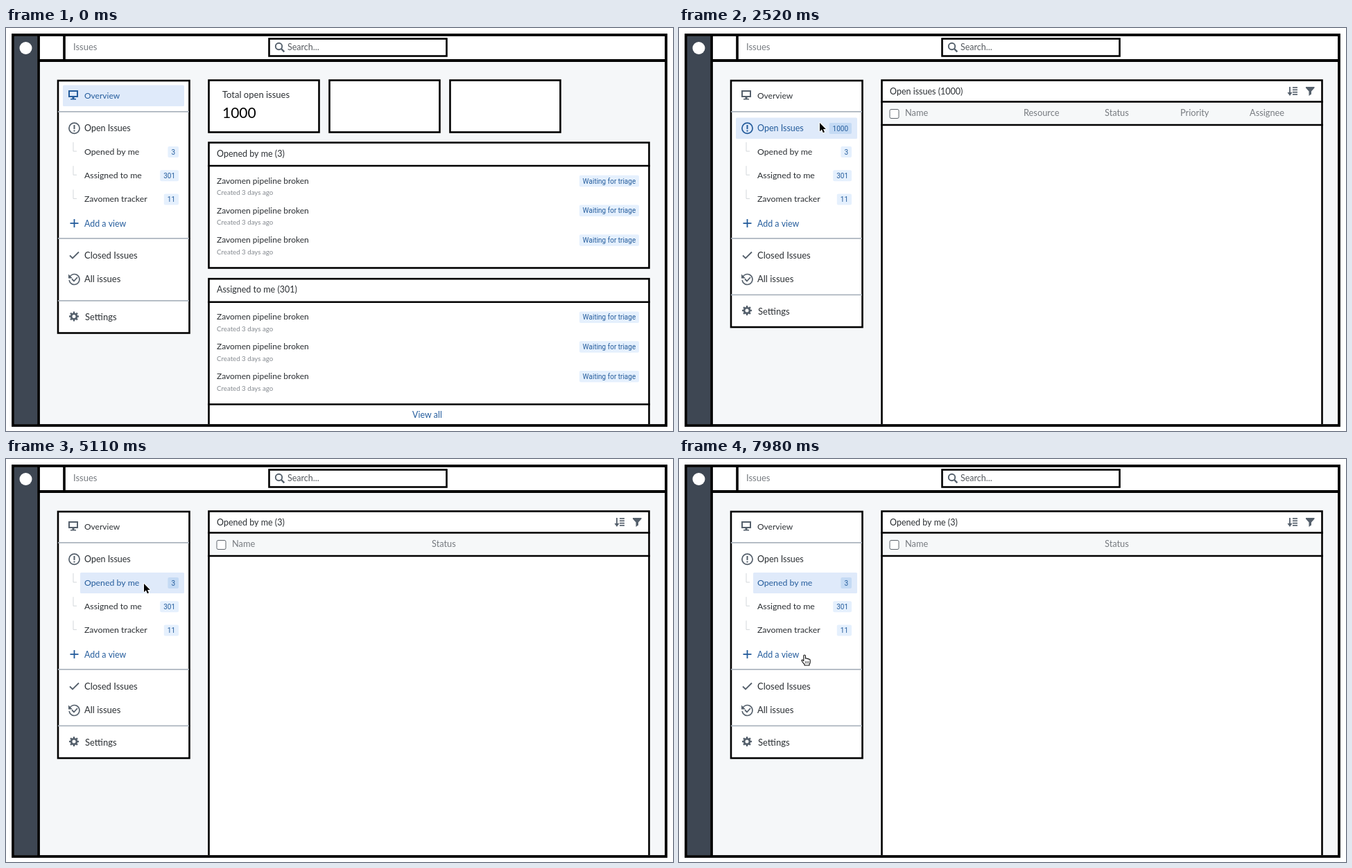
An HTML page with a canvas that plays this animation: 962 px wide and 582 px high, repeating every 8 s.

```html
<!DOCTYPE html>
<html lang="en">
<head>
<meta charset="utf-8">
<title>Issues</title>
<style>
html, body { margin: 0; width: 100%; height: 100%; overflow: hidden; background: #fff; }
canvas { display: block; width: 962px; height: 582px; }
</style>
</head>
<body>
<canvas id="stage" width="962" height="582"></canvas>
<script>
const ctx = document.getElementById('stage').getContext('2d');
const LOOP = 8000, STEP = 70;
const INK = '#2b2f33', GREY = '#777b80', ICON = '#55606c', BLUE = '#245c9c';
const ACTIVE = '#dfeafa', BADGE = '#e5f0fd', BADGE_ON = '#c4daf4';

const linear = p => p;
const easeOut = p => 1 - (1 - p) ** 2;
const easeInOut = p => p * p * (3 - 2 * p);

// Pointer path: time, x, y, easing used to arrive
const path = [
  [210, 332, 549, linear],
  [560, 248, 474, easeOut],
  [840, 248, 474, linear],
  [1190, 206, 259, linear],
  [1680, 203, 137, easeOut],
  [3640, 203, 137, linear],
  [4200, 199, 180, easeInOut],
  [6020, 199, 180, linear],
  [6860, 186, 265, easeInOut],
  [7210, 181, 283, easeOut]
];
const CLICKS = [2450, 4970];
// Clickable band per view: top, bottom
const HOT = [[130, 160], [164, 194], [268, 297]];

function pointerAt(t) {
  if (t < path[0][0]) return null;
  for (let i = 1; i < path.length; i++) {
    const [t0, x0, y0] = path[i - 1], [t1, x1, y1, ease] = path[i];
    if (t <= t1) {
      const p = ease((t - t0) / (t1 - t0));
      return [x0 + (x1 - x0) * p, y0 + (y1 - y0) * p];
    }
  }
  return path[path.length - 1].slice(1, 3);
}

function box(x0, y0, x1, y1, color) {
  ctx.fillStyle = color;
  ctx.fillRect(x0, y0, x1 - x0, y1 - y0);
}

function round(x0, y0, x1, y1, r, color) {
  ctx.fillStyle = color;
  ctx.beginPath();
  ctx.roundRect(x0, y0, x1 - x0, y1 - y0, r);
  ctx.fill();
}

function frame(x0, y0, x1, y1) {
  const w = 2.6;
  box(x0, y0, x1, y1, '#fff');
  ctx.strokeStyle = '#000';
  ctx.lineWidth = w;
  ctx.strokeRect(x0 + 1.5, y0 + 1.5, x1 - x0 - 3, y1 - y0 - 3);
}

function line(points, color, w = 1.6) {
  ctx.strokeStyle = color;
  ctx.lineWidth = w;
  ctx.beginPath();
  points.forEach(([x, y]) => ctx.lineTo(x, y));
  ctx.stroke();
}

const rule = y => line([[291, y], [929, y]], '#000', 2.6);

function shape(points, fill) {
  ctx.fillStyle = fill;
  ctx.beginPath();
  points.forEach(([x, y]) => ctx.lineTo(x, y));
  ctx.closePath();
  ctx.fill();
}

function arc(x, y, r, color, w = 1.6, from = 0, to = Math.PI * 2) {
  ctx.strokeStyle = color;
  ctx.lineWidth = w;
  ctx.beginPath();
  ctx.arc(x, y, r, from, to);
  ctx.stroke();
}

function disc(x, y, r, color) {
  ctx.fillStyle = color;
  ctx.beginPath();
  ctx.arc(x, y, r, 0, Math.PI * 2);
  ctx.fill();
}

function text(str, x, y, { color = INK, size = 13, align = 'left', font = 'SIZEpx Lato, sans-serif' } = {}) {
  ctx.font = font.replace('SIZE', size);
  ctx.fillStyle = color;
  ctx.textAlign = align;
  ctx.fillText(str, x, y);
}

const label = (str, x, y) =>
  text(str, x, y, { color: BLUE, size: 10, align: 'center', font: 'SIZEpx Roboto, sans-serif' });

function badge(count, mid, on) {
  const w = 10 + 5.6 * count.length;
  round(249 - w, mid - 8, 249, mid + 8, 2, on ? BADGE_ON : BADGE);
  label(count, 249 - w / 2, mid + 3.7);
}

function monitor(color) {
  ctx.strokeStyle = color;
  ctx.lineWidth = 2;
  ctx.strokeRect(91, 91, 12, 8);
  box(95.5, 100, 98.5, 102, color);
  box(93, 102, 101, 103.5, color);
}

function alertIcon(color) {
  arc(98.5, 144.7, 7.6, color, 1.7);
  box(97.5, 140, 99.5, 146, color);
  box(97.5, 147.5, 99.5, 149.5, color);
}

function historyIcon() {
  arc(98.5, 363, 7.5, ICON, 1.7, -Math.PI * 0.83, Math.PI * 0.95);
  shape([[90, 355.5], [90, 361.5], [96, 361.5]], ICON);
  line([[95, 362.5], [98, 365.5], [103, 360]], ICON, 1.8);
}

function gear(x, y) {
  for (let i = 0; i < 8; i++) {
    const a = i * Math.PI / 4, c = Math.cos(a), s = Math.sin(a);
    line([[x + 4 * c, y + 4 * s], [x + 7 * c, y + 7 * s]], ICON, 2.4);
  }
  arc(x, y, 3.9, ICON, 2.8);
}

function chrome() {
  box(0, 0, 962, 582, '#fff');
  box(49, 49, 950, 572, '#f5f7f9');
  box(49, 12, 950, 45, '#fff');
  box(12, 12, 45, 572, '#3e4753');
  ctx.strokeStyle = '#000';
  ctx.lineWidth = 3.8;
  ctx.strokeRect(10, 10, 942, 564);
  line([[47, 10], [47, 574]], '#000', 3.8);
  line([[47, 47], [952, 47]], '#000', 3.8);
  line([[84, 10], [84, 47]], '#000', 3.6);
  disc(28.5, 29, 9, '#fff');
  text('Issues', 97, 32, { color: GREY });
  frame(378, 14, 637, 42);
  arc(393.5, 26.5, 4.7, ICON, 1.9);
  line([[397, 30], [401.3, 34.3]], ICON, 2.4);
  text('Search...', 406, 32, { color: '#55595e', size: 12.5 });
}

function sidebar(view) {
  const lift = view ? 8.5 : 0;
  const tone = (i, idle) => view === i ? BLUE : idle;
  frame(73.5, 74.5, 266, 442 - lift);
  [121, 304, 394 - lift].forEach(y => box(75, y - 1, 264, y + 0.7, '#aab3bd'));
  const [x, top, bottom] = [[82, 82.5, 113], [82, 129.5, 160], [107, 164, 194]][view];
  round(x, top, 257, bottom, 1.5, ACTIVE);

  monitor(tone(0, ICON));
  text('Overview', 113, 101.5, { color: tone(0, INK), size: 12 });
  alertIcon(tone(1, ICON));
  text('Open Issues', 113, 149, { color: tone(1, INK), size: 12.5 });
  if (view === 1) badge('1000', 145, true);

  [['Opened by me', '3'], ['Assigned to me', '301'], ['Zavomen tracker', '11']].forEach(([name, count], i) => {
    const y = 179 + i * 34.2;
    line([[97, y - 14], [97, y - 1], [102, y - 1]], '#d3d7db', 1);
    text(name, 113, y + 4, { color: i ? INK : tone(2, INK), size: 12.3 });
    badge(count, y, !i && view === 2);
  });

  line([[92.5, 282], [104.5, 282]], BLUE, 1.8);
  line([[98.5, 276], [98.5, 288]], BLUE, 1.8);
  text('Add a view', 113, 286.5, { color: BLUE, size: 12.4 });
  line([[92, 328.5], [96, 332.5], [105, 323.5]], ICON, 1.8);
  text('Closed Issues', 113, 332.5);
  historyIcon();
  text('All issues', 113, 367);
  gear(98, 416.5 - lift);
  text('Settings', 114, 422 - lift);
}

function issueList(title, top, bottom) {
  frame(291, top, 929, bottom);
  rule(top + 35);
  text(title, 304, top + 21.5, { size: 12.5 });
  for (let i = 0; i < 3; i++) {
    const y = top + 60.7 + i * 42.8;
    text('Zavomen pipeline broken', 304, y, { size: 12 });
    text('Created 3 days ago', 304, y + 16.5, { color: '#858a90', size: 9.7 });
    round(827, y - 12, 913, y + 4.5, 2, BADGE);
    label('Waiting for triage', 870, y - 0.2);
  }
}

function overview() {
  [291, 465, 639].forEach(x => frame(x, 74, x + 162, 152));
  text('Total open issues', 312, 101);
  text('1000', 312, 130, { size: 21, color: '#000' });
  issueList('Opened by me (3)', 164, 348);
  issueList('Assigned to me (301)', 360.7, 600);
  rule(543.5);
  text('View all', 607.5, 563, { color: BLUE, align: 'center', size: 12.4 });
}

function table(title, columns) {
  frame(291, 74, 929, 600);
  box(294, 108, 926, 139, '#f6f8f9');
  rule(106.5);
  rule(140);
  text(title, 304, 96, { size: 12.5 });

  line([[881, 85], [881, 96]], ICON, 1.8);
  shape([[877.5, 93], [884.5, 93], [881, 98]], ICON);
  [86, 89.3, 92.7, 96].forEach(y => line([[885, y], [892, y]], ICON, 1.7));
  shape([[904, 85], [916.5, 85], [916.5, 86.5], [912, 91.5], [912, 95.5], [908.5, 98], [908.5, 91.5], [904, 86.5]], ICON);

  ctx.fillStyle = '#fff';
  ctx.strokeStyle = '#5f656c';
  ctx.lineWidth = 1;
  ctx.beginPath();
  ctx.roundRect(304, 117.5, 13, 13, 2);
  ctx.fill();
  ctx.stroke();
  columns.forEach(([name, x]) => text(name, x, 127, { color: GREY, size: 12.8 }));
}

const arrowShape = new Path2D('M0 0V12.2L2.9 9.6L4.9 14.2L7 13.2L5 8.9H8.8Z');
const handShape = new Path2D(
  'M-1.2 8V1.2Q-1.2 0 0 0T1.4 1.2V5.2Q2.8 4 4 5.6Q5.4 4.8 6.2 6.2Q8.2 5.8 8.2 8V10.5' +
  'Q8.2 12 7 13.4V15H0V13.5Q-2 11.8 -3.8 8.8Q-4.6 7.2 -3.2 7Q-2.4 7 -1.2 8.6Z');

function pointer([x, y], hand) {
  ctx.save();
  ctx.translate(x, y);
  ctx.lineJoin = 'round';
  if (hand) {
    ctx.fillStyle = '#fff';
    ctx.strokeStyle = '#111';
    ctx.lineWidth = 1.1;
    ctx.fill(handShape);
    ctx.stroke(handShape);
    [1.4, 3.6, 5.8].forEach(fx => line([[fx, 9], [fx, 12.5]], '#222', 0.8));
  } else {
    ctx.strokeStyle = '#fff';
    ctx.lineWidth = 1.8;
    ctx.stroke(arrowShape);
    ctx.fillStyle = '#000';
    ctx.fill(arrowShape);
  }
  ctx.restore();
}

function draw(t) {
  const view = CLICKS.filter(c => t >= c).length;
  chrome();
  ctx.save();
  ctx.beginPath();
  ctx.rect(49, 49, 901, 523);
  ctx.clip();
  sidebar(view);
  if (view === 0) overview();
  if (view === 1) {
    table('Open issues (1000)', [['Name', 326], ['Resource', 497], ['Status', 614], ['Priority', 723], ['Assignee', 823]]);
  }
  if (view === 2) table('Opened by me (3)', [['Name', 326], ['Status', 614]]);
  ctx.restore();

  const pos = pointerAt(t);
  if (pos) pointer(pos, pos[1] > HOT[view][0] && pos[1] < HOT[view][1]);
}

const start = performance.now();
function tick() {
  const t = (performance.now() - start) % LOOP;
  draw(Math.floor(t / STEP) * STEP);
  requestAnimationFrame(tick);
}
tick();
</script>
</body>
</html>
```
